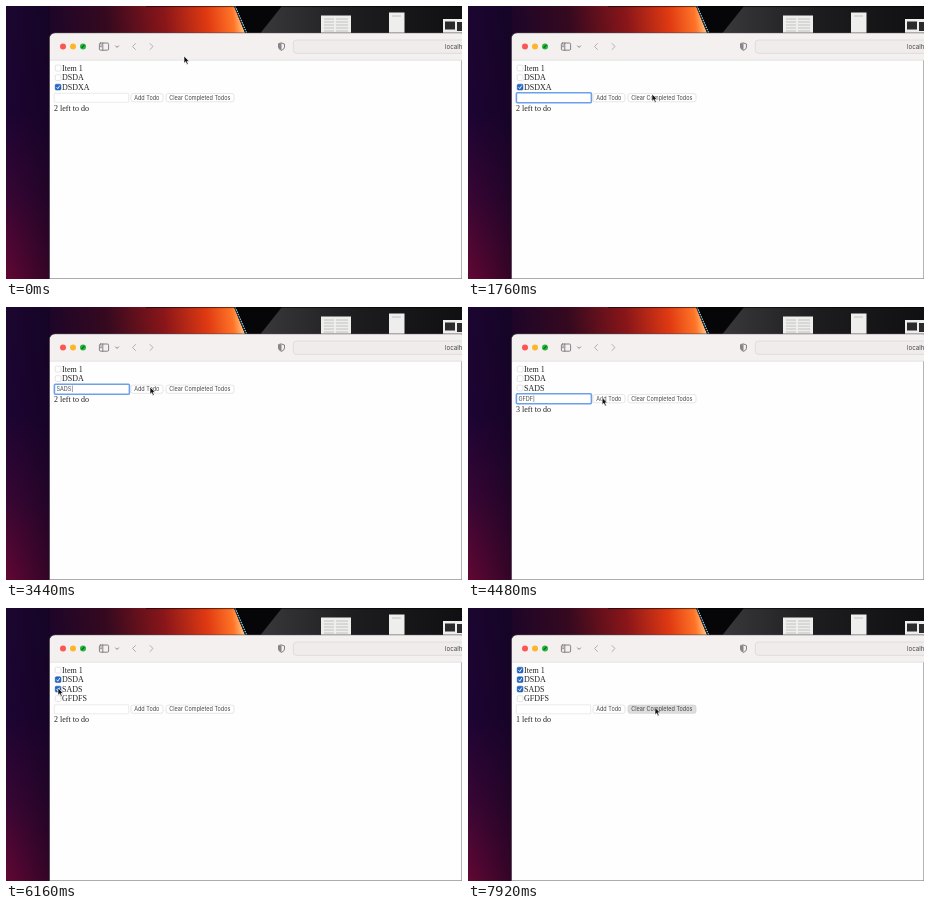
These frames come from a looping animation (456x273 px, 8000 ms). An HTML page:

```html
<!DOCTYPE html>
<html lang="en">
<head>
<meta charset="utf-8">
<title>Todo list</title>
<style>
html, body { margin: 0; width: 100%; height: 100%; overflow: hidden; background: #12031f; }
svg { display: block; width: 456px; height: 273px; }
.page { font: 8px "Liberation Serif", Times, serif; fill: #222; }
.ui { font: 5.5px Inter, "Liberation Sans", sans-serif; fill: #444; }
.line { fill: none; stroke: #77757a; stroke-width: .9; stroke-linecap: round; stroke-linejoin: round; }
</style>
</head>
<body>
<svg viewBox="0 0 456 273">
  <defs>
    <linearGradient id="side" x2="0" y2="1">
      <stop offset="0" stop-color="#1b0630"/>
      <stop offset=".4" stop-color="#1d0433"/>
      <stop offset=".7" stop-color="#380634"/>
      <stop offset="1" stop-color="#620733"/>
    </linearGradient>
    <linearGradient id="shade">
      <stop offset="0" stop-color="#12031f" stop-opacity="0"/>
      <stop offset="1" stop-color="#12031f" stop-opacity=".6"/>
    </linearGradient>
    <linearGradient id="glow" gradientUnits="userSpaceOnUse" x1="44" y1="30" x2="236" y2="8">
      <stop offset="0" stop-color="#1d0529"/>
      <stop offset=".3" stop-color="#35091f"/>
      <stop offset=".6" stop-color="#8a1619"/>
      <stop offset=".82" stop-color="#e03a12"/>
      <stop offset=".95" stop-color="#ff7427"/>
      <stop offset="1" stop-color="#ffc080"/>
    </linearGradient>
    <linearGradient id="steel">
      <stop offset="0" stop-color="#3a3a3c"/>
      <stop offset=".5" stop-color="#1c1c1e"/>
      <stop offset="1" stop-color="#101012"/>
    </linearGradient>
  </defs>

  <!-- desktop -->
  <rect width="60" height="273" fill="url(#side)"/>
  <rect width="44" height="273" fill="url(#shade)"/>
  <path d="M44 0H228L242 34H44Z" fill="url(#glow)"/>
  <path d="M228 0H456V34H242Z" fill="#060608"/>
  <path d="M276 0H456V34H249Z" fill="url(#steel)"/>
  <path d="M229 0L242 30" stroke="#8fd3e8" stroke-width="1.2" stroke-dasharray="1.5 1"/>
  <path d="M140 .6H456" stroke="#000" opacity=".6"/>
  <g fill="#eeeeec">
    <path d="M315 9.5h30V30h-30zM383 6.5h15.5V30H383zM437 13h19v17h-19z"/>
    <path d="M318 13h10m2 0h12M318 16h10m2 0h12M318 19h10m2 0h12M318 22h10m2 0h12M318 25h10m2 0h12M386 10h9" stroke="#b5b5b5" stroke-width=".8"/>
    <path d="M439 15.5h10v8h-10zM451 16h5v9h-5z" fill="#2b2b2d"/>
  </g>

  <!-- browser window -->
  <path d="M43.5 273V33q0-6 6-6H456V273Z" fill="#fefefe" stroke="#4d4350" stroke-width=".8"/>
  <path d="M44 54V33q0-5.5 5.5-5.5H456V54Z" fill="#f4f0f0"/>
  <path d="M44 54.2H456" stroke="#dcd8d8" stroke-width=".7"/>
  <path d="M44 272.6H456" stroke="#aaa5aa" stroke-width=".7"/>
  <circle cx="57" cy="40.5" r="3" fill="#fc5650"/>
  <circle cx="67" cy="40.5" r="3" fill="#fdb52c"/>
  <circle cx="77" cy="40.5" r="3" fill="#27b53c"/>
  <path d="M75.6 41.9L78.4 39.1" stroke="#0a5c18" stroke-width="1.1"/>
  <g class="line">
    <rect x="93.4" y="37" width="9.2" height="7.2" rx="1.2"/>
    <path d="M96.8 37v7.2M94.6 39h.9M94.6 40.7h.9M109.6 39.9l1.5 1.5 1.5-1.5"/>
    <path d="M129.5 37.5l-3 3 3 3M144 37.5l3 3-3 3" stroke="#aaa7aa"/>
    <path d="M275.5 37l3 1v3q0 2.2-3 3.4-3-1.2-3-3.4v-3z"/>
  </g>
  <path d="M275.5 37v7.4q-3-1.2-3-3.4v-3z" fill="#88868a"/>
  <rect x="287.3" y="34" width="190" height="13.3" rx="3" fill="#f0ecec" stroke="#d9d5d5" stroke-width=".7"/>
  <text class="ui" x="439" y="43" style="font-size:6.2px">localhost</text>

  <g id="app"></g>
  <path id="cursor" d="M0 0V7.2L1.7 5.7 2.9 8.4 4.2 7.8 3 5.2H5.2Z" fill="#111" stroke="#fff" stroke-width=".6"/>
</svg>
<script>
const LOOP = 8000, STEP = 80;
const app = document.getElementById('app'), cursor = document.getElementById('cursor');

const todos = [
  { name: 'Item 1', done: 7040 },
  { name: 'DSDA', done: 5600 },
  { name: 'DSDXA', done: 0, removed: 1840 },
  { name: 'SADS', added: 3520, done: 6160 },
  { name: 'GFDFS', added: 4720, done: Infinity }
];
// Input focus spans, with the text typed in each
const edits = [
  { from: 880, to: 1840, text: '', start: 880, pace: 1 },
  { from: 2320, to: 3520, text: 'SADS', start: 2640, pace: 160 },
  { from: 3840, to: 4720, text: 'GFDFS', start: 4080, pace: 120 }
];
const presses = [[1800, 1840, 'clear'], [3480, 3520, 'add'], [4640, 4720, 'add'], [7840, 8000, 'clear']];
// Pointer stops: time, x, y
const stops = [
  [0, 178, 50], [240, 176, 52], [800, 92, 91], [1120, 92, 91], [1680, 184, 88], [1920, 184, 88],
  [2320, 96, 82], [2720, 98, 82], [3280, 144, 80], [3520, 144, 80], [3840, 100, 91], [4080, 102, 91],
  [4400, 134, 90.5], [4720, 135, 91], [5360, 62, 75], [5560, 52, 71], [5760, 52, 71],
  [6080, 52, 80], [6320, 52, 80], [6880, 54, 63], [7120, 53, 62], [7680, 187, 99.5], [8000, 187, 99.5]
];

const rect = (x, y, w, h, r, fill, stroke, sw = .6) =>
  `<rect x="${x}" y="${y}" width="${w}" height="${h}" rx="${r}" fill="${fill}" stroke="${stroke}" stroke-width="${sw}"/>`;
const text = (cls, x, y, s) => `<text class="${cls}" x="${x}" y="${y}">${s}</text>`;

function button(x, y, w, label, down) {
  return rect(x, y - 4.2, w, 8.2, 2, down ? '#dedede' : '#fff', down ? '#c8c8c8' : '#d5d5d5') +
    text('ui', x + 3.2, y + 2, label);
}

function todoRow({ name }, y, checked) {
  const box = checked
    ? rect(49.2, y - 2.8, 5.8, 5.8, 1.2, '#2468c4', '#1d549f', .5) +
      `<path d="M50.6 ${y + .2}l1.2 1.5 2-3.2" fill="none" stroke="#fff" stroke-width=".9"/>`
    : rect(49.2, y - 2.8, 5.8, 5.8, 1.2, '#fff', '#d8d0d2');
  return box + text('page', 56, y + 2.7, name);
}

function field(y, edit, t) {
  if (!edit) return rect(48.3, y - 4.5, 74.4, 9, .5, '#fff', '#dcdcdc');
  const count = Math.max(0, Math.floor((t - edit.start) / edit.pace) + 1);
  const typed = edit.text.slice(0, count);
  const caret = typed || t % 1000 < 500 ? '<tspan fill="#222">|</tspan>' : '';
  return rect(48.4, y - 5, 75, 10, 1, '#fff', '#6d9fec', 1.6) + text('ui', 50.5, y + 2, typed + caret);
}

function pointer(t) {
  const i = stops.findIndex(s => s[0] > t);
  const [t0, x0, y0] = stops[i - 1], [t1, x1, y1] = stops[i];
  const p = (t - t0) / (t1 - t0), e = p * p * (3 - 2 * p);
  return [x0 + (x1 - x0) * e, y0 + (y1 - y0) * e];
}

function draw(t) {
  const list = todos.filter(d => t >= (d.added || 0) && t < (d.removed || Infinity));
  const left = list.filter(d => t < d.done).length;
  const edit = edits.find(e => t >= e.from && t < e.to);
  const down = presses.find(p => t >= p[0] && t < p[1])?.[2];
  const y = 63.3 + 9.5 * list.length;
  app.innerHTML = list.map((d, i) => todoRow(d, 62 + 9.5 * i, t >= d.done)).join('') +
    field(y, edit, t) +
    button(125, y, 32, 'Add Todo', down === 'add') +
    button(160, y, 68, 'Clear Completed Todos', down === 'clear') +
    text('page', 48, y + 12.9, left + ' left to do');
  cursor.setAttribute('transform', `translate(${pointer(t)})`);
}

let last = -1;
function tick(now) {
  const t = Math.floor(now % LOOP / STEP) * STEP;
  if (t !== last) draw(last = t);
  requestAnimationFrame(tick);
}
draw(0);
requestAnimationFrame(tick);
</script>
</body>
</html>
```
